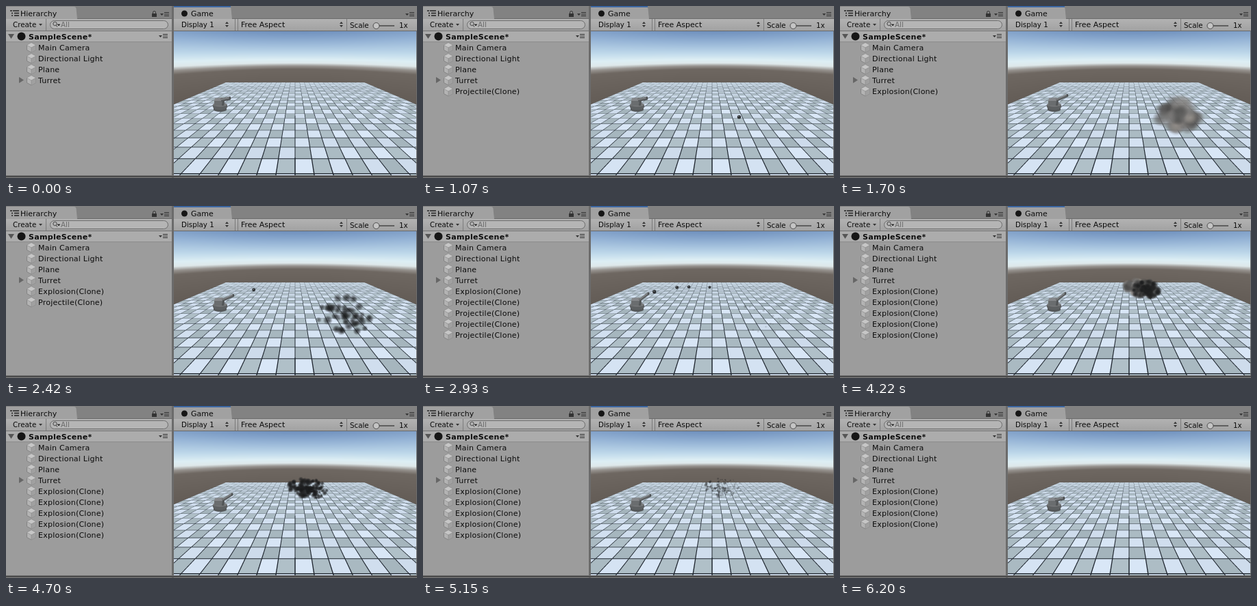
An HTML page with a canvas for the animation above (6.79 s loop, 600 px wide and 252 px high).

```html
<!DOCTYPE html>
<html lang="en">
<head>
<meta charset="utf-8">
<title>Turret scene</title>
<style>
html, body { margin: 0; width: 100%; height: 100%; overflow: hidden; background: #828282; }
svg, canvas { position: absolute; display: block; }
svg { left: 0; top: 0; }
canvas { left: 245px; top: 37px; }
text { font: 11px 'DejaVu Sans', sans-serif; fill: #0b0b0b; }
.bar { font-size: 10.3px; }
.tree { letter-spacing: .24px; }
.bold { font-weight: bold; letter-spacing: .3px; }
</style>
</head>
<body>
<svg width="600" height="252" viewBox="0 0 600 252">
  <defs>
    <linearGradient id="toolbar" x2="0" y2="1">
      <stop stop-color="#b2b2b2"/><stop offset="1" stop-color="#a2a2a2"/>
    </linearGradient>
    <g id="cube">
      <path d="M7 0L13.500 3.500V10.500L7 14L.5 10.500V3.500Z" fill="#b3b3b3" stroke="#7b7b7b" stroke-width=".8"/>
      <path d="M.5 3.500L7 7L13.500 3.500L7 0Z" fill="#c6c6c6"/>
      <path d="M7 7L13.500 3.500V10.500L7 14Z" fill="#a0a0a0"/>
      <path d="M.5 3.500L7 7L13.500 3.500M7 7V14" fill="none" stroke="#8b8b8b" stroke-width=".7"/>
    </g>
    <g id="menu">
      <path d="M0 2H5L2.500 5Z" fill="#333"/>
      <path d="M6 .5H13M6 3H13M6 5.500H13" stroke="#333"/>
    </g>
    <path id="updown" d="M0 4L2.500 1L5 4ZM0 6L2.500 9L5 6Z" fill="#333"/>
  </defs>

  <rect width="600" height="252" fill="#828282"/>
  <rect y="18" width="242" height="230" fill="#9c9c9c"/>
  <path d="M79 18.500H242" stroke="#6c6c6c"/>
  <path d="M0 19V2Q0 1 2 1H99Q102 1 102.500 4L104 19Z" fill="#a1a1a1"/>
  <path d="M6 7H9M10 7H19M8 10.500H10M12 10.500H19M8 14H10M12 14H19" stroke="#222" stroke-width="1.300"/>
  <text x="21" y="15">Hierarchy</text>
  <rect x="213" y="11" width="7" height="5" fill="#333"/>
  <path d="M214.500 11V9.500a2 2 0 0 1 4 0V11" fill="none" stroke="#333"/>
  <use href="#menu" x="225" y="9"/>
  <rect y="19" width="242" height="17" fill="url(#toolbar)"/>
  <path d="M0 36.500H242" stroke="#737373"/>
  <text class="bar" x="10" y="31">Create</text>
  <path d="M48 26H53L50.500 29Z" fill="#333"/>
  <path d="M58.500 19V36" stroke="#7d7d7d"/>
  <rect x="64.500" y="21.500" width="172" height="12" rx="6" fill="#b5b5b5" stroke="#6c6c6c"/>
  <circle cx="71.500" cy="26" r="2.700" fill="none" stroke="#444"/>
  <path d="M73 28L75 31M75 27H79L77 29Z" stroke="#444" stroke-width=".9"/>
  <text class="bar" x="80" y="31" style="fill:#6a6a6a">All</text>

  <rect y="37" width="242" height="15" fill="#acacac"/>
  <path d="M0 52.500H242" stroke="#8c8c8c"/>
  <path d="M3 41H12L7.500 48Z" fill="#555"/>
  <circle cx="22.500" cy="44.500" r="6" fill="#161616"/>
  <text class="bold" x="33" y="49">SampleScene*</text>
  <use href="#menu" x="223" y="41"/>
  <path d="M19 104L26 108.500L19 113Z" fill="#666"/>
  <g id="tree"></g>

  <path d="M243.500 0V252" stroke="#6b6b6b" stroke-width="3"/>
  <rect x="245" y="18" width="355" height="19" fill="#9c9c9c"/>
  <path d="M306 18.500H600" stroke="#6c6c6c"/>
  <path d="M245 19V1H326Q328 1 328.500 4L330 19Z" fill="#a1a1a1"/>
  <path d="M245 1H328" stroke="#3e68a3" stroke-width="2"/>
  <circle cx="260.500" cy="11" r="4.500" fill="#161616"/>
  <text x="270" y="15">Game</text>
  <use href="#menu" x="583" y="9"/>
  <rect x="245" y="19" width="355" height="17" fill="url(#toolbar)"/>
  <path d="M245 36.500H600" stroke="#696969"/>
  <path d="M334.500 19V36M338.500 19V36M497.500 19V36" stroke="#7b7b7b"/>
  <text class="bar" x="256" y="31">Display 1</text>
  <use href="#updown" x="320" y="22"/>
  <text x="343" y="31">Free Aspect</text>
  <use href="#updown" x="487" y="22"/>
  <text class="bar" x="502" y="32">Scale</text>
  <path d="M536 29H567" stroke="#5f5f5f" stroke-width="2"/>
  <circle cx="540.500" cy="29" r="4.500" fill="#c4c4c4" stroke="#4d4d4d"/>
  <text class="bar" x="574" y="32">1x</text>
  <path d="M599.500 37V248" stroke="#6b6b6b"/>
  <path d="M0 248.500H600" stroke="#6e6e6e"/>
  <path d="M0 250H600" stroke="#4a4a4a" stroke-width="2"/>
</svg>
<canvas id="game" width="354" height="211"></canvas>

<script>
const LOOP = 6790, LEFT = 245, TOP = 37, W = 354, H = 211;
const SMOKE_LIFE = 2020, EXPLOSION_LIFE = 5000;
const ctx = document.getElementById('game').getContext('2d');

const clamp = (v, lo, hi) => Math.max(lo, Math.min(hi, v));
const mix = (a, b, k) => a + (b - a) * k;
const mixAll = (a, b, k) => a.map((v, i) => mix(v, b[i], k));

// Piecewise linear lookup in [[key, values], ...]
function lookup(stops, key) {
  if (key <= stops[0][0]) return stops[0][1];
  for (let i = 1; i < stops.length; i++) {
    const [k0, a] = stops[i - 1], [k1, b] = stops[i];
    if (key <= k1) return mixAll(a, b, (key - k0) / (k1 - k0));
  }
  return stops[stops.length - 1][1];
}

function seeded(seed) {
  return () => {
    seed = (seed * 1664525 + 1013904223) >>> 0;
    return seed / 4294967296;
  };
}

// Camera looking down on a tiled plane, 60 degree field of view
const CENTER_X = 422, CENTER_Y = 142.5, FOCAL = 182, HORIZON = 69;
const PITCH = Math.atan((CENTER_Y - HORIZON) / FOCAL);
const PLANE_TOP = 112, HALF_COLUMNS = 15;
const COLUMN = .157, ROW = COLUMN * Math.cos(PITCH) / FOCAL;
const BACK = 1 / ((PLANE_TOP - HORIZON) * ROW);

// Sky colour by the sine of the angle below the horizon
const SKY = [
  [-.143, [110, 143, 188]], [-.066, [152, 182, 215]], [0, [190, 216, 234]],
  [.045, [221, 238, 244]], [.07, [222, 232, 234]], [.092, [150, 146, 142]],
  [.115, [110, 103, 97]], [.215, [103, 96, 90]], [.3, [97, 90, 84]]
];
const LIGHT = [211, 225, 241], DARK = [170, 186, 194], GROUT = [30, 37, 46];
const AVERAGE = mixAll(LIGHT, DARK, .45);

function skyColor(x, y) {
  const dx = x - CENTER_X, dy = y - CENTER_Y;
  const down = FOCAL * Math.sin(PITCH) + dy * Math.cos(PITCH);
  return lookup(SKY, down / Math.hypot(dx, dy, FOCAL));
}

function groundColor(x, y) {
  const d = y - HORIZON;
  const u = (x - CENTER_X) / (d * COLUMN), v = BACK - 1 / (d * ROW);
  if (v < 0 || Math.abs(u) > HALF_COLUMNS) return null;
  const col = Math.floor(u), row = Math.floor(v), fu = u - col, fv = v - row;
  const detail = clamp(ROW * d * d / 4, .3, 1);
  const edge = Math.min(fu, 1 - fu, fv, 1 - fv);
  if (edge < .026) return mixAll(AVERAGE, GROUT, mix(.4, 1, detail));
  const noise = Math.sin(col * 12.9 + row * 78.2) * 6;
  const tile = ((col + row) & 1 ? LIGHT : DARK).map(c => c + noise);
  return mixAll(AVERAGE, tile, detail);
}

function makeBackdrop() {
  const canvas = document.createElement('canvas');
  canvas.width = W;
  canvas.height = H;
  const g = canvas.getContext('2d'), image = g.createImageData(W, H);
  for (let j = 0; j < H; j++) {
    const samples = TOP + j < PLANE_TOP ? 1 : 4;
    for (let i = 0; i < W; i++) {
      const sum = [0, 0, 0];
      for (let s = 0; s < samples * samples; s++) {
        const x = LEFT + i + (s % samples + .5) / samples;
        const y = TOP + j + (Math.floor(s / samples) + .5) / samples;
        const c = y > PLANE_TOP && groundColor(x, y) || skyColor(x, y);
        for (let k = 0; k < 3; k++) sum[k] += c[k];
      }
      const at = (j * W + i) * 4;
      for (let k = 0; k < 3; k++) image.data[at + k] = sum[k] / (samples * samples);
      image.data[at + 3] = 255;
    }
  }
  g.putImageData(image, 0, 0);
  return canvas;
}
const backdrop = makeBackdrop();

// Each shot flies along a quadratic curve and ends in an explosion, nearest first
const shots = [
  { fire: 400, hit: 1200, path: [[329, 134], [406, 149], [488, 169]], size: [2.7, 2.7], blast: [494, 161], scale: 1 },
  { fire: 2190, hit: 3230, path: [[332, 131], [402, 108], [446, 126]], size: [2.7, 1.7], blast: [447, 123], scale: .5 },
  { fire: 2480, hit: 3520, path: [[332, 130], [402, 108], [448, 126]], size: [2.7, 1.7], blast: [449, 122], scale: .5 },
  { fire: 2616, hit: 3600, path: [[331, 129], [397, 107], [440, 128]], size: [2.7, 1.7], blast: [443, 121], scale: .5 },
  { fire: 2876, hit: 3725, path: [[330, 128], [392, 109], [428, 123]], size: [2.7, 1.7], blast: [430, 119], scale: .5 }
];
const objects = shots.flatMap(s => [
  { name: 'Projectile(Clone)', start: s.fire, end: s.hit },
  { name: 'Explosion(Clone)', start: s.hit, end: s.hit + EXPLOSION_LIFE }
]).sort((a, b) => a.start - b.start);

shots.forEach((shot, i) => {
  const random = seeded(71 + i * 977);
  shot.puffs = Array.from({ length: 46 }, () => {
    const angle = random() * Math.PI * 2, reach = random() ** .8;
    return {
      x: Math.cos(angle) * reach * 43,
      y: Math.sin(angle) * reach * 30,
      size: mix(13, 19, random()),
      life: mix(.8, 1, random()) * SMOKE_LIFE,
      tint: mix(-130, 130, random())
    };
  });
});

const SMOKE = [
  [0, [236, 204, 160]], [250, [190, 179, 167]], [480, [126, 125, 124]],
  [680, [42, 42, 42]], [1200, [22, 23, 24]], [2020, [56, 58, 60]]
];

function drawBlast({ hit, blast, scale, puffs }, t) {
  const age = t - hit;
  if (age < 0 || age > SMOKE_LIFE) return;
  const spread = 1 - Math.exp(-age / 450);
  for (const p of puffs) {
    const left = 1 - age / p.life;
    if (left <= 0) continue;
    const x = blast[0] + p.x * spread * scale, y = blast[1] + p.y * spread * scale;
    const r = p.size * scale * left * clamp(.35 + age / 200, 0, 1) + .3;
    const rgb = lookup(SMOKE, age + p.tint).map(Math.round).join();
    const alpha = .85 * clamp(left * 2.5, 0, 1);
    const fill = ctx.createRadialGradient(x, y, 0, x, y, r);
    fill.addColorStop(0, `rgba(${rgb},${alpha})`);
    fill.addColorStop(.5, `rgba(${rgb},${alpha * .65})`);
    fill.addColorStop(1, `rgba(${rgb},0)`);
    ctx.fillStyle = fill;
    ctx.fillRect(x - r, y - r, r * 2, r * 2);
  }
}

function drawBall({ fire, hit, path, size }, t) {
  if (t < fire || t >= hit) return;
  const k = (t - fire) / (hit - fire), [a, b, c] = path;
  const [x, y] = mixAll(mixAll(a, b, k), mixAll(b, c, k), k);
  const r = mix(...size, k);
  ellipse(x, y, r, r, '#2b2e31');
  ellipse(x - r * .2, y - r * .35, r * .4, r * .4, '#62666a');
}

function ellipse(x, y, rx, ry, fill) {
  ctx.fillStyle = fill;
  ctx.beginPath();
  ctx.ellipse(x, y, rx, ry, 0, 0, Math.PI * 2);
  ctx.fill();
}

function polygon(points, fill) {
  ctx.fillStyle = fill;
  ctx.beginPath();
  points.forEach(p => ctx.lineTo(...p));
  ctx.fill();
}

function drum(x, top, bottom, rx, ry, side, cap) {
  ellipse(x, bottom, rx, ry, side);
  ctx.fillRect(x - rx, top, rx * 2, bottom - top);
  ellipse(x, top, rx, ry, cap);
}

function line(x0, y0, x1, y1, width, color) {
  ctx.strokeStyle = color;
  ctx.lineWidth = width;
  ctx.beginPath();
  ctx.moveTo(x0, y0);
  ctx.lineTo(x1, y1);
  ctx.stroke();
}

// Barrel: root x, tip x, tip y, thickness
const BARREL = [
  [1200, [314, 327, 135, 5]], [1610, [316, 332, 131, 4]],
  [2430, [316, 332, 131, 4]], [2960, [316, 329, 128, 4]],
  [4400, [316, 329, 128, 4]], [5150, [316, 332, 131, 4]],
  [5960, [314, 327, 135, 5]]
];

function drawTurret(t) {
  const [root, tipX, tipY, thick] = lookup(BARREL, t);
  drum(312.500, 149, 152, 9.500, 3, '#55585a', '#5f6264');
  drum(312.500, 144.500, 148, 10.500, 3, '#5d6062', '#77797b');
  polygon([[304, 138], [316, 138], [319, 141], [318, 146], [304, 146]], '#6a6d6f');
  polygon([[305, 135], [316, 134], [319, 139], [304, 139]], '#85878a');
  polygon([[316, 138], [319, 139], [318, 146], [315, 146]], '#525557');
  line(root, 138, tipX, tipY, thick, '#56595b');
  line(root, 137, tipX, tipY - 1, thick * .45, '#808385');
  ellipse(tipX, tipY, 1.300, thick / 2, '#4c4f51');
}

// Hierarchy rows
const SVG = 'http://www.w3.org/2000/svg';
const tree = document.getElementById('tree');

function addRow(index, name) {
  const row = document.createElementNS(SVG, 'g');
  const y = 61 + index * 16;
  row.innerHTML = `<use href="#cube" x="30" y="${y - 7}"/><text class="tree" x="47" y="${y + 4}">${name}</text>`;
  tree.append(row);
  return row;
}
const fixed = ['Main Camera', 'Directional Light', 'Plane', 'Turret'];
fixed.forEach((name, i) => addRow(i, name));
const spawned = shots.map((_, i) => addRow(fixed.length + i, ''));

function updateTree(t) {
  const alive = objects.filter(o => t >= o.start && t < o.end);
  spawned.forEach((row, i) => {
    row.style.display = alive[i] ? '' : 'none';
    row.lastChild.textContent = alive[i] ? alive[i].name : '';
  });
}

function render(now) {
  const raw = now % LOOP;
  const t = raw < 260 ? 0 : Math.min(6200, 260 + Math.floor((raw - 260) / 30) * 30);
  ctx.setTransform(1, 0, 0, 1, 0, 0);
  ctx.drawImage(backdrop, 0, 0);
  ctx.translate(-LEFT, -TOP);
  drawTurret(t);
  shots.forEach(s => drawBall(s, t));
  [...shots].reverse().forEach(s => drawBlast(s, t));
  updateTree(t);
}

const began = performance.now();
function tick() {
  render(performance.now() - began);
  requestAnimationFrame(tick);
}
tick();
</script>
</body>
</html>
```
